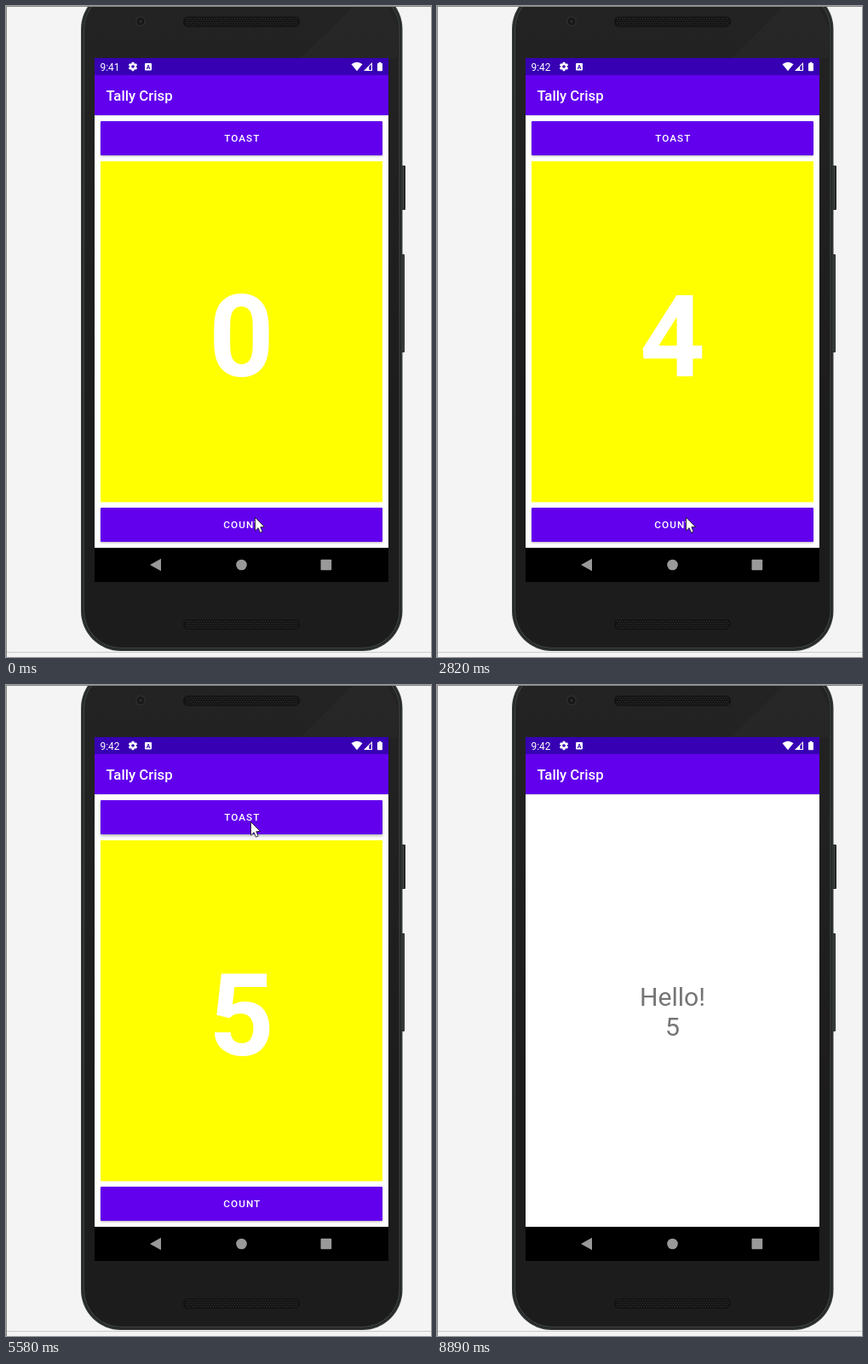
Recreate the animation shown at these times as an HTML page with a canvas. Size 499x763 px, loop 9.39 s.

```html
<!DOCTYPE html>
<html lang="en">
<head>
<meta charset="utf-8">
<title>Counter app</title>
<style>
  html, body { margin: 0; width: 100%; height: 100%; overflow: hidden; background: #f4f4f4; }
  canvas { display: block; }
</style>
</head>
<body>
<canvas id="stage" width="499" height="763"></canvas>
<script>
const ctx = document.getElementById('stage').getContext('2d');
const LOOP = 9390;
const SCREEN = { x: 104, y: 61, w: 345, h: 614 };
const MID_X = SCREEN.x + SCREEN.w / 2;
const MID_Y = SCREEN.y + SCREEN.h / 2;
const PURPLE = '#6200ee', DARK_PURPLE = '#3700b3';

// Times in ms.
const TAPS = [320, 1080, 1660, 2520, 3710];
const TAP_DELAY = 150, TAP_HOLD = 300;
const TOAST_TAP = 5580;
const PAGE_START = 6030, PAGE_STEP = 135;

const CURSOR_HOME = { x: 292, y: 599 };
const MOVES = [
  { start: 3970, end: 4620, steps: 5, x: 307, y: 193 },
  { start: 4790, end: 5190, steps: 3, x: 287, y: 160 },
  { start: 7590, end: 7890, steps: 2, x: 376, y: 472 },
  { start: 8050, end: 8890, steps: 6, x: 505, y: 790 },
];

const clamp = v => Math.max(0, Math.min(1, v));
const lerp = (a, b, u) => a + (b - a) * u;
const easeOut = u => 1 - (1 - u) ** 1.4;

function rect(x, y, w, h, color) {
  ctx.fillStyle = color;
  ctx.fillRect(x, y, w, h);
}

function round(x, y, w, h, r, color) {
  ctx.fillStyle = color;
  ctx.beginPath();
  ctx.roundRect(x, y, w, h, r);
  ctx.fill();
}

function circle(x, y, r, color) {
  ctx.fillStyle = color;
  ctx.beginPath();
  ctx.arc(x, y, r, 0, Math.PI * 2);
  ctx.fill();
}

function poly(points, color) {
  ctx.fillStyle = color;
  ctx.beginPath();
  points.forEach(([x, y]) => ctx.lineTo(x, y));
  ctx.closePath();
  ctx.fill();
}

function text(str, x, y, size, weight, color, align = 'center', spacing = 0) {
  ctx.font = `${weight} ${size}px Roboto, sans-serif`;
  ctx.letterSpacing = spacing + 'px';
  ctx.textAlign = align;
  ctx.fillStyle = color;
  ctx.fillText(str, x, y);
}

function speaker(y) {
  round(208, y, 137, 12, 5, '#131313');
  for (let row = 0; row < 4; row++) {
    for (let x = 211 + (row % 2) * 1.5; x < 343; x += 3) {
      rect(x, y + 1.5 + row * 2.5, 1.4, 1.4, '#2c2c2c');
    }
  }
}

function sideButton(y, w, h) {
  round(464, y, w, h, 1, '#242626');
  rect(466, y + 1, 1, h - 2, '#454747');
}

// Rounded phone outline, shrunk by an inset on every side.
function shell(inset, color) {
  round(88 + inset, -20 + inset, 377.5 - 2 * inset, 776 - 2 * inset, 47 - inset, color);
}

function phone() {
  rect(0, 0, 499, 763, '#f4f4f4');
  rect(0, 757, 499, 1, '#cacaca');
  sideButton(187, 5, 52);
  sideButton(291, 4, 115);

  const body = ctx.createLinearGradient(0, 0, 0, 500);
  body.addColorStop(0, '#232323');
  body.addColorStop(1, '#1c1c1c');
  shell(0, '#343838');
  shell(1.5, '#222525');
  shell(3, '#414545');
  shell(4, body);
  poly([[408, 0], [448, 0], [460, 25], [460, 61], [346, 61]], 'rgba(255,255,255,0.02)');

  speaker(12.5);
  speaker(719);
  circle(158, 18, 6, '#2e2e2e');
  circle(158, 18, 4.5, '#171717');
  circle(158, 18, 2, '#2a2a2a');
  rect(0, 0, 499, 1, '#858585');
  rect(0, 0, 1, 763, '#858585');
}

function button(label, y, pressed) {
  ctx.save();
  ctx.shadowColor = `rgba(0,0,0,${0.3 + pressed * 0.1})`;
  ctx.shadowBlur = 2.5 + pressed * 3;
  ctx.shadowOffsetY = 1 + pressed * 1.5;
  round(111, y, 331, 40, 1, PURPLE);
  ctx.restore();
  text(label, 277.3, y + 24.3, 11.75, 500, '#fff', 'center', 1.05);
}

function page() {
  rect(104, 61, 345, 20, DARK_PURPLE);
  rect(104, 128, 345, 507, '#fff');
  rect(104, 128, 345, 1, '#e4e4e4');
  rect(104, 81, 345, 47, PURPLE);
  rect(104, 635, 345, 40, '#000');
  text('Tally Crisp', 117.5, 111, 16.8, 500, '#fff', 'left');
}

function counterPage(t) {
  const count = TAPS.filter(tap => t >= tap + TAP_DELAY).length;
  const pressed = TAPS.some(tap => t >= tap && t < tap + TAP_HOLD);
  page();
  rect(111, 182, 331, 399.5, '#ff0');
  button('TOAST', 135, t >= TOAST_TAP ? 0.4 : 0);
  button('COUNT', 588, pressed ? 1 : 0);
  text(count, MID_X, 434, 134, 700, '#fff');
}

function helloPage() {
  page();
  text('Hello!', MID_X, 375.6, 30.2, 400, '#757575');
  text('5', MID_X, 411, 30.2, 400, '#757575');
}

function scaled(k, draw) {
  ctx.save();
  ctx.translate(MID_X, MID_Y);
  ctx.scale(k, k);
  ctx.translate(-MID_X, -MID_Y);
  draw();
  ctx.restore();
}

// The counter page grows and dims while the hello page settles over it.
function pages(t) {
  if (t < PAGE_START) return counterPage(t);
  const u = clamp(Math.floor((t - PAGE_START) / PAGE_STEP) / 2);
  if (u < 1) {
    scaled(lerp(1.041, 1.1, u), () => counterPage(t));
    rect(SCREEN.x, SCREEN.y, SCREEN.w, SCREEN.h, 'rgba(0,0,0,0.18)');
  }
  scaled(lerp(0.979, 1, easeOut(u)), helloPage);
}

function gear(x, y) {
  circle(x, y, 4, '#fff');
  for (let i = 0; i < 6; i++) {
    ctx.save();
    ctx.translate(x, y);
    ctx.rotate(i * Math.PI / 3);
    rect(-1.4, -5.2, 2.8, 3, '#fff');
    ctx.restore();
  }
  circle(x, y, 1.8, DARK_PURPLE);
}

function wifi(x, y) {
  ctx.fillStyle = '#fff';
  ctx.beginPath();
  ctx.moveTo(x, y);
  ctx.lineTo(x - 6.5, y - 8);
  ctx.quadraticCurveTo(x, y - 13, x + 6.5, y - 8);
  ctx.fill();
}

function systemBars(t) {
  text(t < TAPS[0] ? '9:41' : '9:42', 110.5, 75.7, 11.9, 400, '#fff', 'left');
  gear(149, 71);
  round(163, 67, 8, 8.5, 1, '#fff');
  text('A', 167, 74, 7, 700, DARK_PURPLE);
  wifi(412, 76.3);
  poly([[430, 66], [430, 76], [420, 76]], '#fff');
  poly([[428.8, 68.6], [428.8, 74.9], [426.3, 74.9], [426.3, 71.1]], DARK_PURPLE);
  round(436, 67, 6, 9.3, 0.8, '#fff');
  rect(437.7, 65.8, 2.6, 1.5, '#fff');

  poly([[169, 655], [182, 647.8], [182, 662.2]], '#999');
  circle(MID_X, 655, 6.3, '#999');
  round(369.5, 648.8, 12.7, 12.4, 1, '#999');
}

function cursorAt(t) {
  return MOVES.reduce((pos, { start, end, steps, x, y }) => {
    const step = Math.floor((t - start) * steps / (end - start));
    const u = easeOut(clamp(step / steps));
    return { x: lerp(pos.x, x, u), y: lerp(pos.y, y, u) };
  }, CURSOR_HOME);
}

function cursor({ x, y }) {
  ctx.save();
  ctx.translate(Math.round(x) + 0.5, Math.round(y) + 0.5);
  poly([[0, 0], [0, 15.5], [3.6, 12.2], [6, 17.7], [8.6, 16.6], [6.3, 11.2], [11, 11]], '#fff');
  ctx.strokeStyle = '#111';
  ctx.lineWidth = 0.8;
  ctx.stroke();
  ctx.restore();
}

function render(t) {
  phone();
  ctx.save();
  ctx.beginPath();
  ctx.rect(SCREEN.x, SCREEN.y, SCREEN.w, SCREEN.h);
  ctx.clip();
  rect(SCREEN.x, SCREEN.y, SCREEN.w, SCREEN.h, '#000');
  pages(t);
  systemBars(t);
  ctx.restore();
  cursor(cursorAt(t));
}

function tick() {
  render(performance.now() % LOOP);
  requestAnimationFrame(tick);
}
tick();
</script>
</body>
</html>
```
